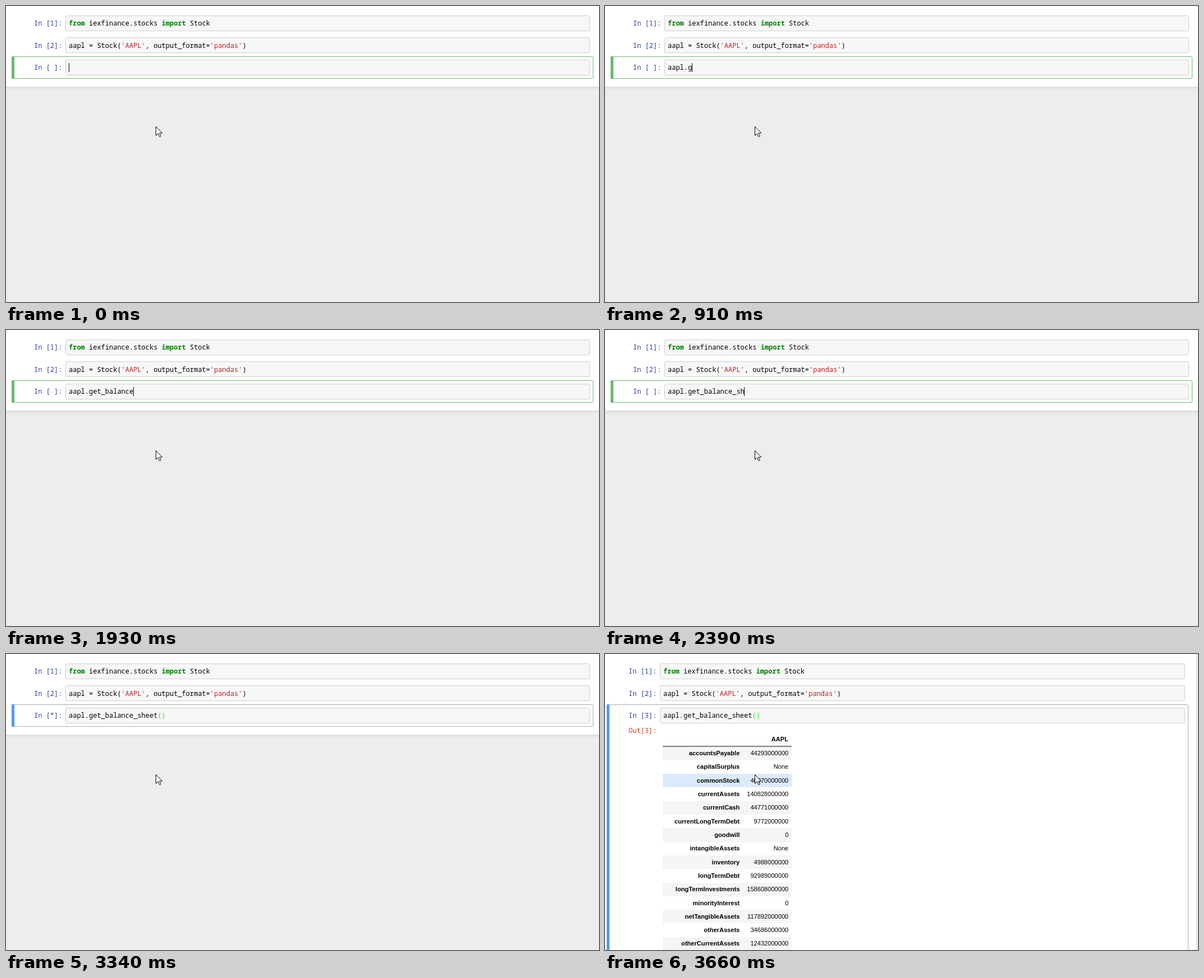
An HTML page for the animation above (5040 ms loop, 1058 by 529 pixels).

```html
<!DOCTYPE html>
<html lang="en">
<head>
<meta charset="utf-8">
<title>Notebook</title>
<style>
  html, body { margin: 0; width: 100%; height: 100%; overflow: hidden; background: #fff; }
  svg { display: block; width: 100vw; height: 100vh; }
  text { white-space: pre; }
  .code { font: 12px "Noto Sans Mono", "DejaVu Sans Mono", monospace; }
  .table { font: 11.1px "Liberation Sans", Arial, sans-serif; }
  .end { text-anchor: end; }
  .bold { font-weight: bold; }
  .in { fill: #303f9f; }
  .out { fill: #d84315; }
  .kw { fill: #008000; font-weight: bold; }
  .str { fill: #ba2121; }
  .match { fill: #0f0; }
  .input { fill: #f7f7f7; stroke: #cfcfcf; }
</style>
</head>
<body>
<svg id="stage" viewBox="0 0 1058 529" preserveAspectRatio="none">
  <defs>
    <linearGradient id="shade" x2="0" y2="1">
      <stop offset="0" stop-color="#dcdcdc"/>
      <stop offset=".5" stop-color="#e8e8e8"/>
      <stop offset="1" stop-color="#ededed"/>
    </linearGradient>
  </defs>
  <rect width="1058" height="529" fill="#fff"/>
  <g id="below">
    <rect y="144" width="1058" height="385" fill="#ededed"/>
    <rect y="144" width="1058" height="8" fill="url(#shade)"/>
  </g>
  <g id="edge">
    <rect x="1055" width="1" height="529" fill="#dcdcdc"/>
    <rect x="1056" width="2" height="529" fill="#e9e9e9"/>
  </g>
  <rect id="frame" rx="2" fill="none"/>
  <rect id="bar" y="90" width="5"/>
  <g id="inputs"></g>
  <g id="lines"></g>
  <rect id="caret" y="102" width="1" height="16"/>
  <g id="result"></g>
  <path d="M267.5 215.5v16l3.8-3.6 2.7 5.9 2.4-1.1-2.6-5.6h5z" fill="#fff" stroke="#000"/>
</svg>
<script>
const LOOP = 5040, CHAR = 7.2;
const RUN = 3340, DONE = 3570, HOVER = 3660;
const CODE = 'aapl.get_balance_sheet';

// [time, caret column]
const KEYS = [
  [0, 0], [380, 1], [530, 2], [610, 3], [690, 4], [840, 5], [910, 6],
  [1070, 8], [1300, 9], [1460, 10], [1540, 11], [1620, 12], [1700, 13],
  [1770, 14], [1850, 15], [1930, 16], [2160, 17], [2240, 18],
  [2390, 19], [2480, 20], [2620, 22], [2850, 23], [3020, 24]
];

const TOPS = [17, 56, 96];
const BASES = [35, 75, 114];

const ROWS = [
  ['accountsPayable', '44293000000'],
  ['capitalSurplus', 'None'],
  ['commonStock', '40970000000'],
  ['currentAssets', '140828000000'],
  ['currentCash', '44771000000'],
  ['currentLongTermDebt', '9772000000'],
  ['goodwill', '0'],
  ['intangibleAssets', 'None'],
  ['inventory', '4988000000'],
  ['longTermDebt', '92989000000'],
  ['longTermInvestments', '158608000000'],
  ['minorityInterest', '0'],
  ['netTangibleAssets', '117892000000'],
  ['otherAssets', '34686000000'],
  ['otherCurrentAssets', '12432000000']
];

const $ = id => document.getElementById(id);
const label = (x, y, cls, body, id = '') =>
  `<text x="${x}" y="${y}" class="${cls}"${id && ` id="${id}"`}>${body}</text>`;
const span = (cls, s) => `<tspan class="${cls}">${s}</tspan>`;

function attrs(id, values) {
  for (const key in values) $(id).setAttribute(key, values[key]);
}
const show = (id, on) => attrs(id, { visibility: on ? 'visible' : 'hidden' });

// Places a one-pixel outline whose outer edges snap to whole pixels.
function outline(id, left, right, top, bottom) {
  const x = Math.round(left);
  attrs(id, { x: x + 0.5, y: top + 0.5, width: Math.round(right) - x - 1, height: bottom - top - 1 });
}

function buildCells() {
  const code = [
    `${span('kw', 'from')} iexfinance.stocks ${span('kw', 'import')} Stock`,
    `aapl = Stock(${span('str', "'AAPL'")}, output_format=${span('str', "'pandas'")})`,
    ''
  ];
  $('inputs').innerHTML = TOPS.map((_, i) => `<rect id="input${i}" class="input" rx="2"/>`).join('');
  $('lines').innerHTML = BASES.map((y, i) =>
    label(50, y, 'code in', `In [${i + 1}]:`, 'prompt' + i) +
    label(112, y, 'code', code[i], 'line' + i)).join('');
}

function buildResult() {
  const pitch = 24.32;
  const rowTop = i => Math.round(165.3 + pitch * i);
  const rows = ROWS.map(([name, value], i) => {
    const y = rowTop(i), base = Math.round(181 + pitch * i);
    return `<rect id="row${i}" x="103" y="${y}" width="230" height="${rowTop(i + 1) - y}" ` +
      `fill="${i % 2 ? '#fff' : '#f5f5f5'}"/>` +
      label(240.3, base, 'table end bold', name) +
      label(327.3, base, 'table end', value);
  });
  $('result').innerHTML = label(42, 141, 'code out', 'Out[3]:') +
    label(327, 156, 'table end bold', 'AAPL') + rows.join('') +
    '<rect x="103" y="164.5" width="230" height="1"/>';
}

function render(t) {
  const running = t >= RUN, done = t >= DONE;
  const col = KEYS.filter(k => k[0] <= t).pop()[1];
  const shift = done ? 7.5 : 0;
  const bottom = done ? 540 : 130;

  outline('frame', 10 - shift, 1048 - shift, 90, bottom);
  attrs('frame', { stroke: running ? '#ababab' : '#66bb6a' });
  attrs('bar', { x: Math.round(10 - shift), height: bottom - 90, fill: running ? '#4f9cf0' : '#66bb6a' });
  TOPS.forEach((y, i) => outline('input' + i, 105.8 - shift, 1042.3 - shift, y, y + 28));

  attrs('lines', { transform: `translate(${-Math.ceil(shift)})` });
  $('prompt2').textContent = `In [${done ? 3 : running ? '*' : ' '}]:`;
  $('line2').innerHTML = CODE.slice(0, col) + (col > CODE.length ? span('match', '()') : '');
  attrs('caret', { x: Math.floor(112 + CHAR * col) });
  show('caret', t < 70 || (t >= 380 && !running));

  show('below', !done);
  show('edge', done);
  show('result', done);
  attrs('row2', { fill: t >= HOVER ? '#dcebfc' : '#f5f5f5' });
}

buildCells();
buildResult();

const start = performance.now();
function tick() {
  render((performance.now() - start) % LOOP);
  requestAnimationFrame(tick);
}
tick();
</script>
</body>
</html>
```
